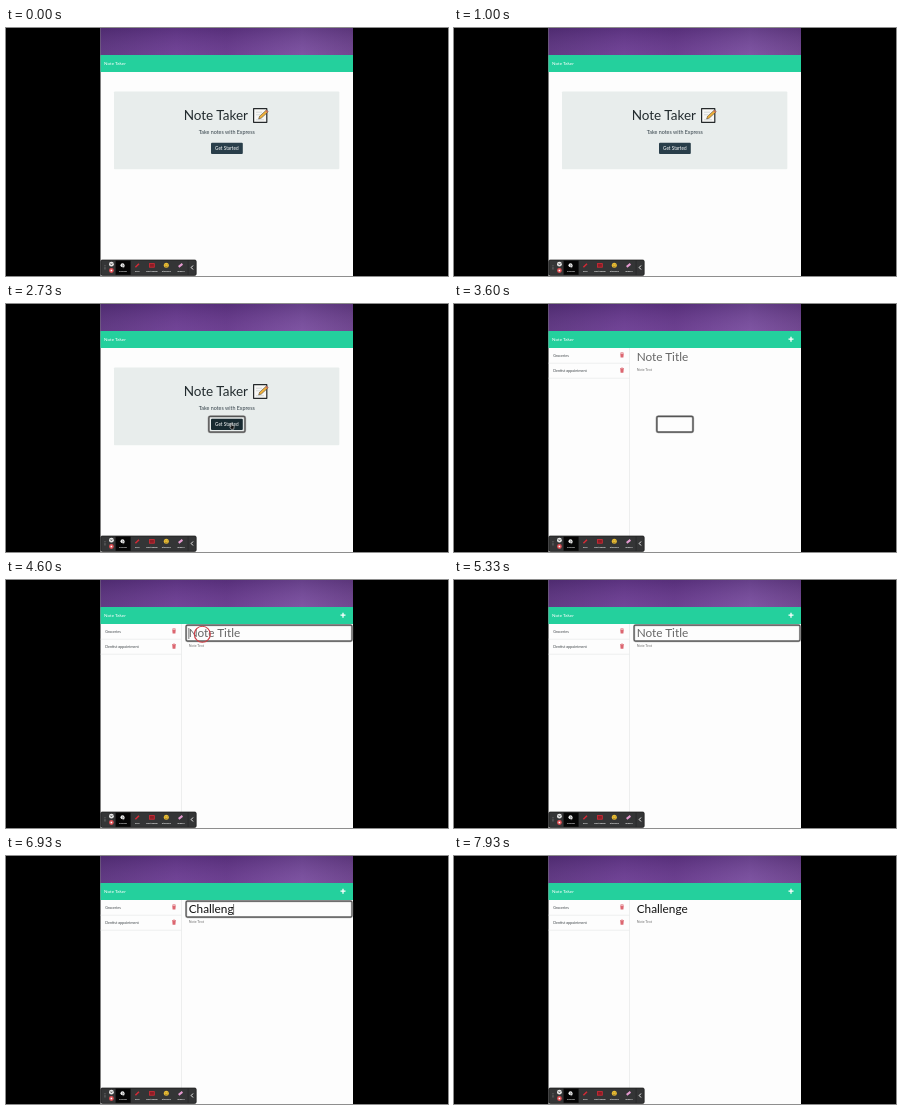
Recreate the animation shown at these times as an HTML page. Size 442 px wide and 248 px high, loop 8 s.

```html
<!DOCTYPE html>
<html lang="en">
<head>
<meta charset="utf-8">
<title>Note Taker</title>
<style>
  html, body { margin: 0; width: 100%; height: 100%; overflow: hidden; background: #000; }
  svg { display: block; width: 100%; height: 100%; font-family: Lato, sans-serif; }
  .mid { text-anchor: middle; }
</style>
</head>
<body>
<svg viewBox="0 0 442 248">
  <defs>
    <linearGradient id="purple">
      <stop offset="0" stop-color="#553078"/>
      <stop offset=".3" stop-color="#693c90"/>
      <stop offset=".5" stop-color="#623687"/>
      <stop offset=".8" stop-color="#79509e"/>
      <stop offset="1" stop-color="#684087"/>
    </linearGradient>
    <linearGradient id="shade" x2="0" y2="1">
      <stop offset="0" stop-color="#40205f" stop-opacity=".35"/>
      <stop offset="1" stop-color="#9568b5" stop-opacity=".2"/>
    </linearGradient>
    <g id="trash" fill="#dc6670">
      <path d="M-2-2.2h1.2l.4-.5h.8l.4.5H2v.7h-4zM-1.7-1.1h3.4l-.3 3.6h-2.8z"/>
    </g>
  </defs>

  <rect width="442" height="248"/>
  <rect x="94.5" width="252.5" height="248" fill="#fdfdfd"/>
  <rect x="94.5" width="252.5" height="27.5" fill="url(#purple)"/>
  <rect x="94.5" width="252.5" height="27.5" fill="url(#shade)"/>
  <rect x="94.5" y="27" width="252.5" height="17" fill="#24d09d"/>
  <text x="98" y="37" font-size="4.6" fill="#fff">Note Taker</text>

  <g id="home">
    <rect x="108" y="63.5" width="225.3" height="77.8" rx=".8" fill="#e8edec"/>
    <text x="177.7" y="91.8" font-size="13.5" fill="#222b2e">Note Taker</text>
    <g stroke-linejoin="round">
      <rect x="247.6" y="80.7" width="13.2" height="13.6" fill="#f7f7f5" stroke="#25292b" stroke-width="1.2"/>
      <path d="M250 84.2h6M250 86.8h4M250 91.8h8" stroke="#b9bfc0" stroke-width=".6"/>
      <path d="M252.6 91l1-2.8 6.8-6.2 1.8 1.8-6.8 6.2z" fill="#efb13c" stroke="#39332a" stroke-width=".5"/>
      <path d="M259.4 82.9l1-1 1.8 1.8-1 1z" fill="#c96b60"/>
    </g>
    <text class="mid" x="220.8" y="105.8" font-size="5.35" fill="#35424a">Take notes with Express</text>
    <rect id="button" x="205" y="114.7" width="31.8" height="11.2" rx="1"/>
    <text class="mid" x="220.8" y="121.9" font-size="4.65" fill="#fff">Get Started</text>
  </g>

  <g id="notes">
    <path d="M337 32.7v5M334.5 35.2h5" stroke="#fff" stroke-width="1.3"/>
    <path d="M175.5 44v204M94.5 59.2h81M94.5 74.2h81" stroke="#e3e5e5" stroke-width=".6"/>
    <g font-size="3.7" fill="#3d4347">
      <text x="99.3" y="52.6">Groceries</text>
      <text x="99.3" y="67.9">Dentist appointment</text>
    </g>
    <use href="#trash" x="168" y="51"/>
    <use href="#trash" x="168" y="66.2"/>
    <text x="182.7" y="66.8" font-size="3.6" fill="#777">Note Text</text>
    <g id="titleRing" fill="none">
      <rect x="180.1" y="45.1" width="165.9" height="16" rx="1.5" stroke="#bbb" stroke-width="2.2"/>
      <rect x="180.1" y="45.1" width="165.9" height="16" rx="1.5" stroke="#555" stroke-width="1.1"/>
    </g>
    <text id="title" x="182.7" y="57.4" font-size="11.8"></text>
    <rect id="caret" y="48" width=".6" height="11" fill="#222"/>
    <circle id="click" cx="196.3" cy="54.3" r="8" fill="none" stroke="#cf3d45" stroke-width="1.1"/>
  </g>

  <g id="buttonRing" fill="none">
    <rect x="202.8" y="112.4" width="36.2" height="15.8" rx="1.6" stroke="#aaa" stroke-width="2.3"/>
    <rect x="202.8" y="112.4" width="36.2" height="15.8" rx="1.6" stroke="#555" stroke-width="1.2"/>
  </g>
  <path id="hand" d="M224.8 119.2q.6-.5 1 .2v1.8l2 .5q.6.3.4 1l-.5 2.6h-2.4l-1.8-2.4q.1-.8 1.3-.1z"
        fill="#111" stroke="#fff" stroke-width=".5"/>

  <g>
    <rect x="94.8" y="232" width="95.4" height="15.4" rx="1.4" fill="#343536" stroke="#171717" stroke-width=".7"/>
    <path d="M98.5 237.5v4.5M99.6 237.5v4.5" stroke="#999" stroke-width=".5" stroke-dasharray=".6 .8"/>
    <circle cx="105.4" cy="236.2" r="2.4" fill="#e8e8e8"/>
    <path d="M104.5 235.3l1.8 1.8m0-1.8l-1.8 1.8" stroke="#333" stroke-width=".6"/>
    <circle cx="105.4" cy="242.5" r="2.4" fill="#dc4b50"/>
    <rect x="104.6" y="241.7" width="1.6" height="1.6" fill="#fff"/>
    <rect x="109.6" y="232.6" width="15" height="14.2" fill="#050505"/>
    <circle cx="116.5" cy="237.2" r="2" fill="#eee"/>
    <path d="M116.4 236.6l2.7 2.5-1.4.1-.7 1.2z" fill="#fff" stroke="#000" stroke-width=".3"/>
    <path d="M129.4 239.3l3.6-3.5" stroke="#d52b36" stroke-width="1.5"/>
    <rect x="143.5" y="235.6" width="4.8" height="3.6" fill="#8d1d26" stroke="#d52b36" stroke-width=".8"/>
    <circle cx="160.3" cy="237.3" r="2.5" fill="#e9bd35"/>
    <path d="M159.3 236.5v.5M161.3 236.5v.5M158.9 238q1.4 1.4 2.8 0" stroke="#543b13" stroke-width=".4" fill="none"/>
    <path d="M172.7 238.9l3.7-3" stroke="#e59bd0" stroke-width="2"/>
    <g class="mid" font-size="2.6" font-weight="700" fill="#f2f2f2">
      <text x="117" y="243.6">Mouse</text>
      <text x="131.2" y="243.6">Pen</text>
      <text x="146" y="243.6">Rectangle</text>
      <text x="160.4" y="243.6">Stickers</text>
      <text x="175" y="243.6">Eraser</text>
    </g>
    <path d="M182.1 232.5v14.4" stroke="#202020" stroke-width=".5"/>
    <path d="M187 237.5l-1.8 2 1.8 2" fill="none" stroke="#fff" stroke-width=".9"/>
  </g>
</svg>

<script>
const LOOP = 8000;
const WORD = "Challenge";
const TYPE_START = 5850, TYPE_STEP = 140;
const TYPE_END = TYPE_START + TYPE_STEP * WORD.length;
const HOVER = 1100, PRESS = 2450, OPEN = 3200, FOCUS = 4450, BLUR = 7600;

const el = id => document.getElementById(id);
const show = (id, on) => el(id).setAttribute("visibility", on ? "visible" : "hidden");
const title = el("title");

function render(t) {
  const during = (from, to) => t >= from && t < to;
  const open = t >= OPEN;

  // Display also hides children that set their own visibility.
  el("home").style.display = open ? "none" : "";
  el("notes").style.display = open ? "" : "none";
  el("button").setAttribute("fill", t < HOVER ? "#293e4a" : "#182a31");
  show("hand", during(HOVER, OPEN));
  show("buttonRing", during(PRESS, 3850));

  const count = Math.max(0, Math.min(WORD.length, Math.floor((t - TYPE_START) / TYPE_STEP) + 1));
  const text = count ? WORD.slice(0, count) : "Note Title";
  if (title.textContent !== text) title.textContent = text;
  title.setAttribute("fill", count ? "#111" : "#666");

  const typing = during(TYPE_START, TYPE_END);
  const blinkFrom = t < TYPE_START ? FOCUS : TYPE_END;
  const blinkOn = (t - blinkFrom) % 1000 < 500;
  show("titleRing", during(FOCUS, BLUR));
  show("caret", during(FOCUS, BLUR) && (typing || blinkOn));
  if (open) {
    const width = count ? title.getComputedTextLength() : 0;
    el("caret").setAttribute("x", 182.6 + width);
  }
  show("click", during(FOCUS, 4800));
}

function tick(now) {
  render(now % LOOP);
  requestAnimationFrame(tick);
}
render(0);
requestAnimationFrame(tick);
</script>
</body>
</html>
```
